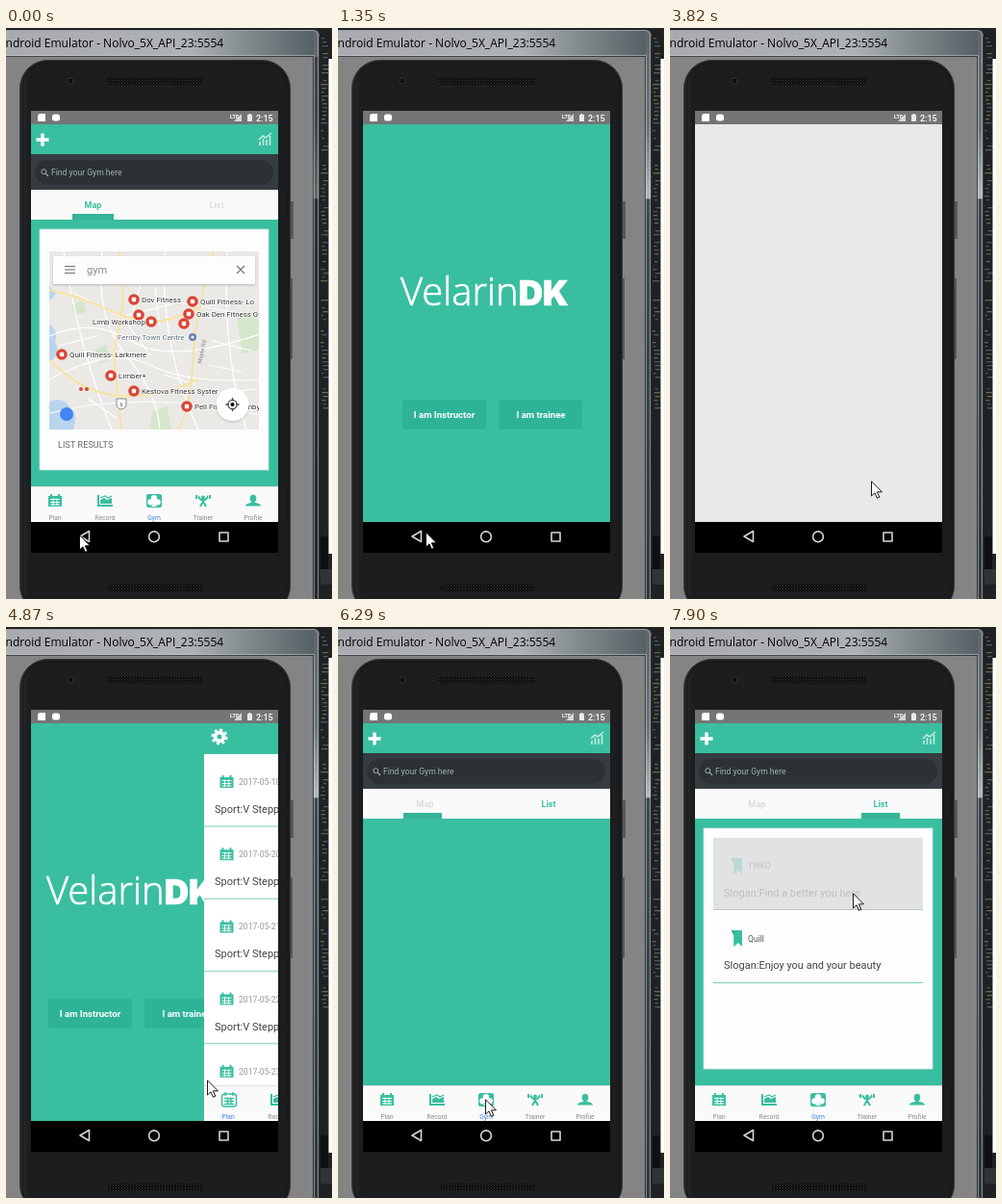
An HTML page for the animation above (8 s loop, 339x593 px).

```html
<!DOCTYPE html>
<html lang="en">
<head>
<meta charset="utf-8">
<title>Gym app walkthrough</title>
<style>
html, body { margin: 0; width: 100%; height: 100%; overflow: hidden; background: #1f2021; }
svg { display: block; width: 339px; height: 593px; }
text { font-family: Roboto, sans-serif; white-space: pre; }
.title { font: 12px "Open Sans", sans-serif; }
.green { fill: #3abea0; }
.small { font-size: 8.6px; }
.body { font-size: 11px; fill: #444; }
.mid { text-anchor: middle; }
.tab { font-size: 9px; font-weight: 700; text-anchor: middle; }
.label { font-size: 6.7px; fill: #8b8b8b; text-anchor: middle; }
.on { fill: #3f83f0; }
.btn { font-size: 9.6px; font-weight: 700; fill: #fff; text-anchor: middle; }
.poi { font-size: 7.9px; fill: #333; stroke: #fff; stroke-width: 1.6px; paint-order: stroke; }
.logo { font: 300 40px "Open Sans", sans-serif; fill: #fff; stroke: #fff; stroke-width: .7px; }
.logo tspan { font: 900 35px Inter, sans-serif; }
.logo.mini { font-size: 13px; stroke: #266b55; stroke-width: 2.5px; paint-order: stroke; }
.logo.mini tspan { font-size: 11px; }

.anim { animation: 8s step-end infinite; }
#cursor { animation-name: cursor; }
#splash { animation-name: splash; }
#map { animation-name: map; }
#plan { animation-name: plan; }
#press { animation-name: press; }
#gym { animation-name: gym; }
#card { animation-name: card; }
#bar { animation-name: bar; }
#dialog { animation-name: dialog; }
#dim { animation-name: dim; }
#blank { animation-name: blank; }
#item { animation-name: item; }
#held { animation-name: held; }
#edge { animation-name: edge; }

@keyframes cursor {
  0% { transform: translate(76px, 526px); }
  1.5% { transform: translate(76px, 525px); }
  15% { transform: translate(84px, 524px); }
  16.875% { transform: translate(91px, 523px); }
  18.75% { transform: translate(108px, 514px); }
  20.25% { transform: translate(145px, 493px); }
  21.75% { transform: translate(183px, 473px); }
  23.25% { transform: translate(203px, 464px); }
  24.75% { transform: translate(209px, 462px); }
  32% { transform: translate(209px, 466px); }
  33.5% { transform: translate(209px, 470px); }
  68.375% { transform: translate(196px, 476px); }
  70.25% { transform: translate(167px, 487px); }
  72.125%, 88% { transform: translate(153px, 490px); }
  88.5% { transform: translate(155px, 472px); }
  90% { transform: translate(163px, 420px); }
  91.5% { transform: translate(176px, 350px); }
  93.375% { transform: translate(187px, 293px); }
  95%, 100% { transform: translate(190px, 276px); }
}
@keyframes splash {
  0% { transform: translateX(-77px); }
  8.75% { transform: translateX(-65px); }
  10.625% { transform: translateX(-32px); }
  12.5% { transform: translateX(-10px); }
  13.75% { transform: translateX(-2px); }
  15% { transform: none; }
  60.875% { transform: translateX(-23px); }
  62.75% { transform: translateX(-62px); }
  64.625%, 100% { transform: translateX(-76px); }
}
@keyframes map {
  0% { transform: none; }
  8.75% { transform: translateX(40px); }
  10.625% { transform: translateX(150px); }
  12.5% { transform: translateX(225px); }
  13.75% { transform: translateX(250px); }
  15%, 100% { transform: translateX(260px); }
}
@keyframes plan {
  0% { transform: translateX(260px); }
  60.875% { transform: translateX(180px); }
  62.75% { transform: translateX(50px); }
  64.625% { transform: translateX(4px); }
  66.5%, 100% { transform: none; }
}
@keyframes press { 0%, 100% { opacity: 0; } 75.5% { opacity: 1; } }
@keyframes gym { 0% { visibility: hidden; } 78.625%, 100% { visibility: visible; } }
@keyframes card {
  0% { transform: translateX(260px); }
  80.125% { transform: translateX(90px); }
  81.625%, 100% { transform: none; }
}
@keyframes bar {
  0% { transform: translateX(-131px); }
  80.125% { transform: translateX(-45px); }
  81.625%, 100% { transform: none; }
}
@keyframes dialog { 0%, 47.75%, 100% { opacity: 0; } 44% { opacity: .42; } 45.875% { opacity: .9; } }
@keyframes dim { 0%, 47.75%, 100% { opacity: 0; } 45.875% { opacity: .2; } }
@keyframes blank { 0%, 53%, 100% { opacity: 0; } 47.75% { opacity: 1; } }
@keyframes item { 0% { opacity: 1; } 96.875% { opacity: .6; } 98.75%, 100% { opacity: .22; } }
@keyframes held { 0% { opacity: 0; } 96.875% { opacity: .5; } 98.75%, 100% { opacity: 1; } }
@keyframes edge { 0% { opacity: .5; } 5%, 100% { opacity: 0; } }
</style>
</head>
<body>
<svg viewBox="0 0 339 593" xmlns="http://www.w3.org/2000/svg">
<defs>
  <clipPath id="screen"><path d="M26 100H283V513H26Z"/></clipPath>
  <clipPath id="mapBox"><path d="M45 232H263V417H45Z"/></clipPath>
  <linearGradient id="glass">
    <stop offset="0" stop-color="#a9abb0"/><stop offset=".6" stop-color="#aeb1b5"/>
    <stop offset=".8" stop-color="#7d878a"/><stop offset="1" stop-color="#566165"/>
  </linearGradient>
  <linearGradient id="side" x2="0" y2="1">
    <stop offset="0" stop-color="#5f676b"/><stop offset=".17" stop-color="#6c7478"/>
    <stop offset=".295" stop-color="#b4bbbe"/><stop offset=".298" stop-color="#404a51"/>
    <stop offset="1" stop-color="#31393d"/>
  </linearGradient>
  <linearGradient id="shell">
    <stop offset="0" stop-color="#2a2b2c"/><stop offset=".035" stop-color="#1c1d1e"/>
    <stop offset="1" stop-color="#1c1d1e"/>
  </linearGradient>
  <pattern id="mesh" width="3" height="3" patternUnits="userSpaceOnUse">
    <path d="M0 0H3V3H0Z" fill="#0b0b0b"/><path d="M0 0H1V1H0ZM1.5 1.5H2.5V2.5H1.5Z" fill="#3b3b3b"/>
  </pattern>
  <filter id="soft" x="-20%" y="-20%" width="140%" height="150%">
    <feDropShadow dx="0" dy="1" stdDeviation="1.2" flood-opacity=".22"/>
  </filter>
  <filter id="deep" x="-20%" y="-40%" width="140%" height="200%">
    <feDropShadow dx="0" dy="3" stdDeviation="5" flood-opacity=".22"/>
  </filter>

  <!-- icons are centred on the origin -->
  <g id="calendar">
    <path d="M-7-5H7V6H-7ZM-5-7H-3V-4H-5ZM3-7H5V-4H3Z"/>
    <path d="M-5-1.5H5M-5 1.5H5M-5 4H5M-2-2.5V5M2-2.5V5" stroke="#fff" stroke-width=".9"/>
  </g>
  <g id="record">
    <path d="M-8-6H-6V4H8V6H-8Z"/><path d="M-5 3V-1L-1-3 2-1 7-3V3Z"/>
    <path d="M-5-3 0-5 3-3 7-5" fill="none" stroke="#3abea0" stroke-width="1.3"/>
  </g>
  <g id="club">
    <circle cy="-2.8" r="3.1"/><circle cx="-3.7" cy="1.3" r="3.1"/><circle cx="3.7" cy="1.3" r="3.1"/>
    <path d="M-1.5-1H1.5L1.1 3 3 6H-3L-1.1 3Z"/>
  </g>
  <g id="lifter">
    <circle cy="-3.7" r="1.9"/>
    <path d="M-5-4-2-1H2L5-4M0-1V2M-3 6-.5 1.5M3 6 .5 1.5" fill="none" stroke="#3abea0" stroke-width="2"/>
    <path d="M-8-6H-6V-2H-8ZM-5-5.5H-4V-2.5H-5ZM8-6H6V-2H8ZM5-5.5H4V-2.5H5Z"/>
  </g>
  <g id="person">
    <ellipse cy="-2.4" rx="3.3" ry="3.9"/><path d="M-8 5.5Q-8 3-1.7 1.8V0H1.7V1.8Q8 3 8 5.5Z"/>
  </g>
  <path id="plus" d="M-1.7-6.5H1.7V-1.7H6.5V1.7H1.7V6.5H-1.7V1.7H-6.5V-1.7H-1.7Z" fill="#fff"/>
  <g id="mark">
    <path d="M0 0H11V17L7 13 2.2 17V5Z" fill="#3abea0"/><path d="M0 0 2.2 5V0Z" fill="#2a9c82"/>
  </g>
  <g id="pin">
    <circle r="5.8" fill="#dc4436"/><rect x="-2.2" y="-2.2" width="4.4" height="4.4" rx=".8" fill="#fff"/>
  </g>
  <g id="activeGym">
    <rect x="146" y="484" width="16" height="14" rx="2" class="green"/>
    <use href="#club" x="154" y="491" fill="#fff"/><text class="label on" x="154" y="511">Gym</text>
  </g>
  <rect id="panel" x="35" y="209" width="238" height="250" fill="#fdfdfd" stroke="#c6e6de" stroke-width=".8"/>

  <g id="tabs">
    <path d="M26 476H283V514H26Z" fill="#fafafa"/><path d="M26 476.5H283" stroke="#e2e2e2"/>
    <g class="green">
      <use href="#record" x="103" y="491"/><use href="#lifter" x="205" y="491"/><use href="#person" x="257" y="491"/>
    </g>
    <text class="label" x="103" y="511">Record</text>
    <text class="label" x="205" y="511">Trainer</text>
    <text class="label" x="257" y="511">Profile</text>
  </g>
  <g id="gymFrame">
    <path d="M26 100H283V514H26Z" class="green"/>
    <use href="#plus" x="38" y="116"/>
    <path d="M264 122V118M267.5 122V115M271 122V116M274.5 122V112M263 116 267 112 270 114 276 109" fill="none" stroke="#c3ebe0" stroke-width="1.6"/>
    <path d="M26 131H283V168H26Z" fill="#363c40"/>
    <rect x="30" y="137" width="248" height="26" rx="13" fill="#2b3135" stroke="#30363a"/>
    <path d="M41.3 151.2 44 154" stroke="#a7b0b2" stroke-width="1.2"/>
    <circle cx="39.3" cy="149.2" r="2.5" fill="none" stroke="#a7b0b2"/>
    <text class="small" x="47" y="153" fill="#a3adaf">Find your Gym here</text>
    <path d="M26 168H283V199H26Z" fill="#fafafa"/>
    <use href="#tabs"/><use href="#calendar" x="51" y="491" class="green"/>
    <text class="label" x="51" y="511">Plan</text>
    <use href="#activeGym"/>
  </g>
</defs>

<!-- desktop and window -->
<path d="M0 0H339V593H0Z" fill="#1f2122"/>
<g id="code"></g>
<path d="M335.5 32H339V546H335.5Z" fill="#fff"/>
<path d="M327 528H335V562H327Z" fill="#0e1011"/><path d="M327 562H339V578H327Z" fill="#303436"/>
<path d="M0 2H320Q326 2 326 8V593H0Z" fill="url(#side)"/>
<path d="M0 3H320V30H0Z" fill="url(#glass)"/>
<path class="anim" id="edge" d="M320 30H325V593H320Z" fill="#15191b"/>
<path d="M0 2.5H319Q324.5 2.5 324.5 9V593M0 28.5H320.5V593" fill="none" stroke="#d2d8da" stroke-opacity=".5"/>
<path d="M0 29.5H319.5V593M325.5 9V593" fill="none" stroke="#2c3133" stroke-opacity=".8"/>
<text class="title" x="-8" y="20">Android Emulator - Nolvo_5X_API_23:5554</text>
<path d="M0 30H319V593H0Z" fill="#848484"/>

<!-- handset -->
<path d="M295 180H299V219H295ZM295 260H298V344H295Z" fill="#56585a"/>
<rect x="14.5" y="33.5" width="281" height="575" rx="29" fill="url(#shell)" stroke="#333435"/>
<rect x="17" y="36" width="276" height="572" rx="27" fill="none" stroke="#161718"/>
<circle cx="67" cy="55" r="3" fill="#0c0d0e" stroke="#303437"/>
<rect x="104" y="51" width="101" height="8" rx="4" fill="url(#mesh)"/>
<rect x="106" y="578" width="99" height="8" rx="4" fill="url(#mesh)"/>
<path d="M26 86H283V545H26Z"/>
<path d="M26 86H283V100H26Z" fill="#757575"/>
<g fill="#fff">
  <path d="M34.5 89H41V97H33V91Z"/><rect x="48" y="89.5" width="8" height="7" rx="2.5"/>
  <path d="M237 97 245 89V97Z" opacity=".7"/><path d="M251 90H252.5V89H254.5V90H256V97H251Z" opacity=".85"/>
  <text x="233" y="94" font-size="5.6" font-weight="700">LTE</text>
  <text x="260" y="96.6" font-size="9" font-weight="500">2:15</text>
</g>
<g fill="none" stroke="#d6d6d6" stroke-width="1.6" stroke-linejoin="round">
  <path d="M86.5 522.5V533.5L77 528Z"/><circle cx="154" cy="528.3" r="5.4"/><path d="M222 524H231V533H222Z"/>
</g>

<g clip-path="url(#screen)">
  <g class="anim" id="splash">
    <path d="M26 100H363V514H26Z" class="green"/>
    <text class="logo" x="65" y="288">Velarin<tspan>DK</tspan></text>
    <g fill="#2fb396">
      <rect x="67" y="386" width="87" height="30.5" rx="2"/><rect x="167" y="386" width="87" height="30.5" rx="2"/>
    </g>
    <text class="btn" x="110.5" y="405">I am Instructor</text>
    <text class="btn" x="211" y="405">I am trainee</text>
  </g>

  <g class="anim" id="map">
    <use href="#gymFrame"/>
    <text class="tab green" x="90.5" y="187">Map</text>
    <text class="tab" x="219" y="187" fill="#dedede">List</text>
    <path d="M69 193H112V199H69Z" fill="#35b497"/>
    <use href="#panel"/>
    <g clip-path="url(#mapBox)">
      <path d="M45 232H263V417H45Z" fill="#ebe9e6"/>
      <path d="M45 308Q55 314 51 326 58 340 45 346ZM45 388Q60 382 66 394 76 400 70 417H45ZM45 268 52 276 45 284Z" fill="#b9d5ee"/>
      <path d="M240 300 263 294V334L246 338ZM92 334 104 329 109 344 97 349ZM152 399 168 393 172 417H150ZM68 288 80 283 84 295 71 298Z" fill="#d5e7ca"/>
      <g fill="none" stroke="#fff" stroke-width="1.2">
        <path d="M45 320Q90 300 130 325T263 318M45 365Q110 330 150 350T263 365M60 232Q75 330 110 417M100 232Q92 300 125 340T160 417M165 232Q160 330 200 417M230 232Q225 340 250 417M45 400Q150 375 263 402M140 266 128 310 150 340M70 275 120 300 180 285 263 300"/>
        <path d="M55 330 95 320M80 350 120 335M155 270 160 310M215 325 255 335M210 350 245 357M165 360 195 370M85 385 115 405M210 380 260 375"/>
      </g>
      <g fill="none" stroke="#f8e3a0" stroke-width="2">
        <path d="M45 272Q80 280 105 292T150 305 200 290M216 232Q196 300 194 350T178 417M45 345Q80 380 120 382T200 365M118 232 122 285 112 340 120 417"/>
      </g>
      <text transform="translate(203 349) rotate(-78)" font-size="6" fill="#858585">Maple Rd</text>
      <path d="M115 385H125V391Q125 395 120 396 115 395 115 391Z" fill="#fff" stroke="#888"/>
      <text class="mid" x="120" y="393" font-size="6" fill="#555">6</text>
      <circle cx="78" cy="375" r="2" fill="#dc4436"/><circle cx="84" cy="375" r="2" fill="#dc4436"/>
      <circle cx="194" cy="321" r="4" fill="#6684b4"/><circle cx="194" cy="321" r="1.5" fill="#fff"/>
      <g id="pins"></g>
      <text class="poi" x="116" y="324" style="fill:#5f6d80">Fernby Town Centre</text>
      <circle cx="63" cy="401" r="7" fill="#4285f4"/>
      <rect x="49" y="237" width="210" height="29" rx="1" fill="#fdfdfd" filter="url(#soft)"/>
      <path d="M61 247.5H72M61 251H72M61 254.5H72M240 247 248 255M248 247 240 255" stroke="#707070" stroke-width="1.1"/>
      <text x="84" y="255" font-size="11" fill="#8c8c8c">gym</text>
      <circle cx="235.5" cy="391" r="17" fill="#fff" filter="url(#soft)"/>
      <circle cx="235.5" cy="391" r="4.6" fill="none" stroke="#444" stroke-width="1.3"/>
      <circle cx="235.5" cy="391" r="2"/>
      <path d="M235.5 384V387M235.5 395V398M228.5 391H231.5M239.5 391H242.5" stroke="#444" stroke-width="1.3"/>
    </g>
    <text x="54" y="436" font-size="9" letter-spacing=".1" fill="#666">LIST RESULTS</text>
  </g>

  <g class="anim" id="plan">
    <path d="M26 100H283V132H26Z" class="green"/><path d="M26 132H283V514H26Z" fill="#fff"/>
    <circle cx="42" cy="114" r="4.5" fill="none" stroke="#fff" stroke-width="4"/>
    <circle cx="42" cy="114" r="7.4" fill="none" stroke="#fff" stroke-width="2.4" stroke-dasharray="3 2.81"/>
    <text class="logo mini" x="127" y="119">Velarin<tspan>DK</tspan></text>
    <use href="#plus" x="267" y="114"/>
    <g id="rows"></g>
    <use href="#tabs"/>
    <rect x="44.5" y="485" width="15" height="13" rx="3" fill="none" stroke="#3abea0" stroke-width="1.5"/>
    <path d="M48 483V487M56 483V487M47 489.5H57M47 492.5H57M47 495.5H57M50.5 489V496M54 489V496" stroke="#3abea0" stroke-width="1.4"/>
    <text class="label on" x="51" y="511">Plan</text>
    <use href="#club" x="154" y="491" class="green"/><text class="label" x="154" y="511">Gym</text>
    <g class="anim" id="press"><path d="M129 477H179V514H129Z" fill="#f1f4f5"/><use href="#activeGym"/></g>
  </g>

  <g class="anim" id="gym">
    <use href="#gymFrame"/>
    <text class="tab" x="90.5" y="187" fill="#cfcfcf" style="font-weight:400">Map</text>
    <text class="tab green" x="219" y="187">List</text>
    <path class="anim" id="bar" d="M199 193H239V199H199Z" fill="#35b497"/>
    <g class="anim" id="card">
      <use href="#panel"/>
      <path class="anim" id="held" d="M45 219H263V293H45Z" fill="#e1e2e3"/>
      <path d="M45 293.5H263" stroke="#b9c9c5"/><path d="M45 369.5H263" stroke="#7fd0bc"/>
      <g class="anim" id="item">
        <use href="#mark" x="64" y="240"/><text class="small" x="81" y="251" fill="#555">TWKO</text>
        <text class="body" x="56" y="280">Slogan:Find a better you here</text>
      </g>
      <use href="#mark" x="64" y="315"/><text class="small" x="81" y="327" fill="#555">Quill</text>
      <text class="body" x="56" y="355">Slogan:Enjoy you and your beauty</text>
    </g>
  </g>

  <g class="anim" id="dialog">
    <path d="M42 275H266V338H42Z" fill="#484848" filter="url(#deep)"/>
    <g fill="#fff" fill-opacity=".85">
      <text x="57" y="300" font-size="12.3">Please wait...</text>
      <text x="57" y="325" font-size="9.8">Fetching JS bundle</text>
    </g>
  </g>
  <path class="anim" id="blank" d="M26 100H283V514H26Z" fill="#e9e9e9"/>
</g>
<path class="anim" id="dim" d="M26 86H283V513H26Z"/>
<path class="anim" id="cursor" d="M.5 .8V16L4 12.8 6.4 18.3 8.8 17.3 6.4 11.8H11.4Z" fill="#fff" stroke="#000" stroke-width=".9"/>
</svg>

<script>
const fill = (id, html) => { document.getElementById(id).innerHTML = html; };

const places = [
  [133, 282, "Dov Fitness"], [194, 284, "Quill Fitness- Lo"], [138, 298], [151, 305, "Limb Workshop", 90],
  [190, 297, "Oak Den Fitness Gyr"], [185, 307], [58, 339, "Quill Fitness- Larkmere"],
  [109, 361, "Limber+"], [133, 377, "Kestova Fitness Syster"], [188, 393, "Pell Fitness- Fernby"]
];
fill("pins", places.map(([x, y, name = "", left = x + 8]) =>
  `<use href="#pin" x="${x}" y="${y}"/><text class="poi" x="${left}" y="${y + 3}">${name}</text>`).join(""));

const plans = [[18, 14, 6], [20, 21, 9], [21, 7, 3], [22, 7, 3], [23, 7, 3]];
fill("rows", plans.map(([day, step, ski], i) => `<g transform="translate(0 ${i * 75.2})">
  <use href="#calendar" x="49.5" y="161" class="green"/>
  <text class="small" x="62" y="164" fill="#999">2017-05-${day}</text>
  <text class="body" x="37" y="193">Sport:V Stepper: ${step}.0minute  Skier: ${ski}.0minute</text>
  <path d="M26 207H283" stroke="#a5dccf" stroke-width="1.5"/></g>`).join(""));

// specks of editor text behind the window
let seed = 7;
const rnd = () => (seed = seed * 16807 % 2147483647) / 2147483647;
const inks = ["#59664a", "#6c6a4c", "#505658", "#465c66"];
let specks = "";
for (let y = 6; y < 395; y += 4) {
  if (rnd() < .3) continue;
  const w = 2 + rnd() * 6;
  specks += `<rect x="${327 + rnd() * 3}" y="${y}" width="${w}" height="1.3" fill="${inks[rnd() * 4 | 0]}"/>`;
}
fill("code", specks);
</script>
</body>
</html>
```
